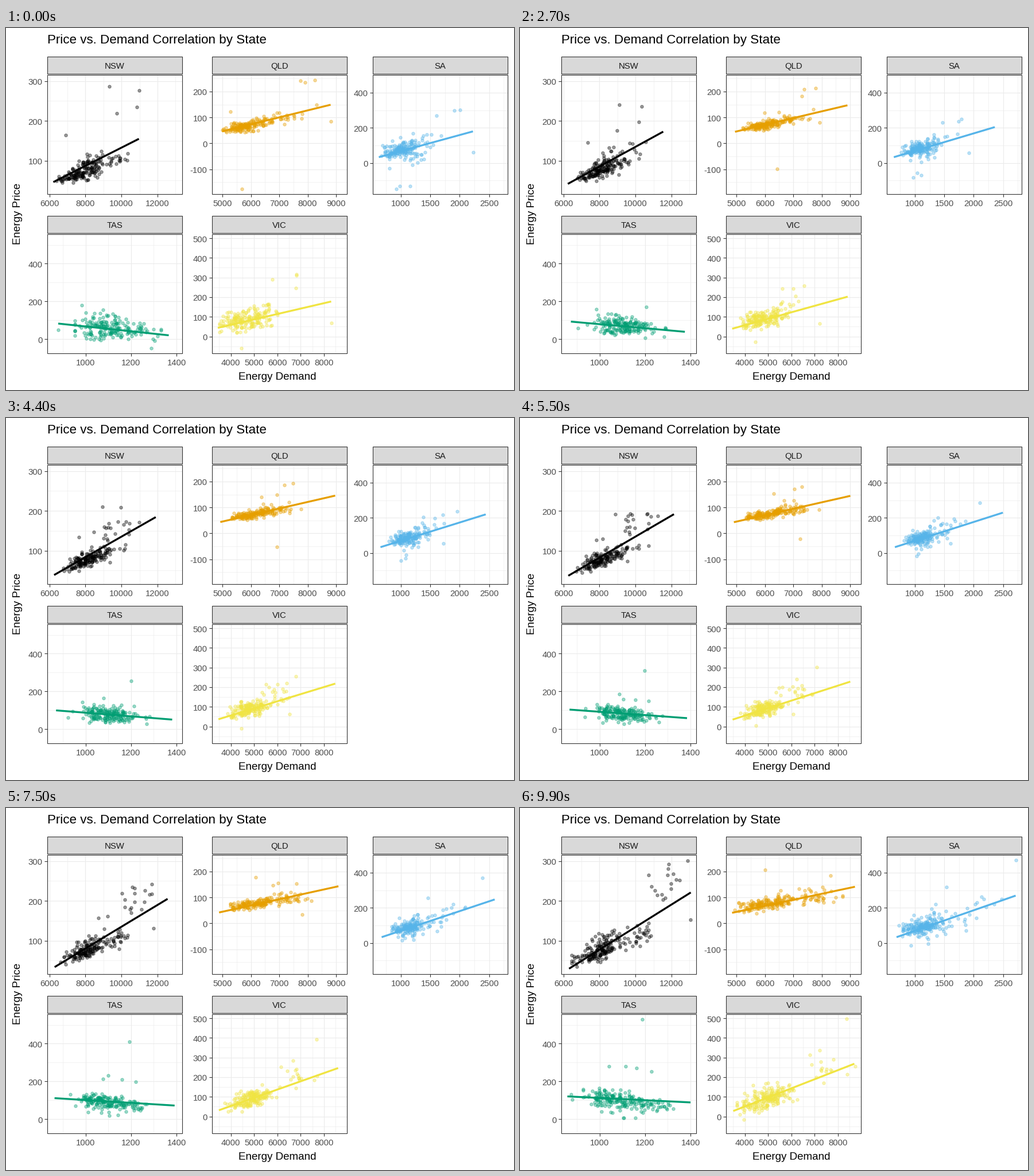
A matplotlib script that plays this animation: 885 px wide and 632 px high, repeating every 10000 ms.

```python
import matplotlib.pyplot as plt
import numpy as np
from matplotlib.animation import FuncAnimation
from matplotlib.collections import LineCollection
from matplotlib.patches import Rectangle

W, H, DPI = 885, 632, 100
FRAMES, INTERVAL = 100, 100
PX = 72 / DPI          # points per pixel
DARK, GRID, TICK_TEXT = "#333333", "#EBEBEB", "#4D4D4D"
PANEL_W, PANEL_H, STRIP_H = 235.5, 208, 30
N_CLOUD, N_LATE = 180, 22

plt.rcParams["font.family"] = "Liberation Sans"
fig = plt.figure(figsize=(W / DPI, H / DPI), dpi=DPI, facecolor="white")
ax = fig.add_axes([0, 0, 1, 1])
ax.set(xlim=(0.5, W + 0.5), ylim=(H + 0.5, 0.5))   # pixels, y pointing down
ax.axis("off")


def label(x, y, text, size, color="black", ha="center", rotation=0):
    ax.text(x, y, text, fontsize=size * PX, color=color, ha=ha, va="baseline",
            rotation=rotation, rotation_mode="anchor")


def lines(segments, color, width, z):
    ax.add_collection(LineCollection(segments, colors=color,
                                     linewidths=width * PX, zorder=z))


def box(x, y, w, h, fill, z):
    ax.add_patch(Rectangle((x, y), w, h, facecolor=fill, edgecolor=DARK,
                           linewidth=1.1 * PX, zorder=z))


def ticks(scale, lo, hi):
    """Major pixels and values, and the half steps between them."""
    value, pixel, step, gap = scale
    k = np.arange(-1, 12) / 2
    pos = pixel + gap * k
    inside = (pos > lo + 1) & (pos < hi - 1)
    major = inside & (k % 1 == 0)
    return pos[major], value + step * k[major], pos[inside & ~major]


def draw_panel(name, x, y, xscale, yscale):
    right, top = x + PANEL_W, y + STRIP_H + 2
    bottom = top + PANEL_H
    box(x, y, PANEL_W, STRIP_H, "#D9D9D9", 1)
    label(x + PANEL_W / 2, y + 21.5, name, 14.9, "#1A1A1A")

    xmaj, xval, xmin = ticks(xscale, x, right)
    ymaj, yval, ymin = ticks(yscale, top, bottom)
    for xs, ys, width in ((xmin, ymin, 0.6), (xmaj, ymaj, 1.1)):
        lines([[(u, top), (u, bottom)] for u in xs], GRID, width, 1)
        lines([[(x, v), (right, v)] for v in ys], GRID, width, 1)
    box(x, top, PANEL_W, PANEL_H, "none", 6)
    lines([[(u, bottom), (u, bottom + 5)] for u in xmaj], DARK, 1.1, 6)
    lines([[(x - 5, v), (x, v)] for v in ymaj], DARK, 1.1, 6)

    for u, value in zip(xmaj, xval):
        label(u, bottom + 21.5, f"{value:.0f}", 14.9, TICK_TEXT)
    for v, value in zip(ymaj, yval):
        label(x - 8, v + 6.5, f"{value:.0f}", 14.9, TICK_TEXT, ha="right")


def cloud(rng, blobs, n, tilt, spread=1.0):
    """Draw n points from blobs (weight, cx, cy, sx, sy), sheared by tilt."""
    b = np.array(blobs, float)
    pick = rng.choice(len(b), n, p=b[:, 0] / b[:, 0].sum())
    _, cx, cy, sx, sy = b[pick].T
    u, v = spread * np.clip(rng.normal(size=(2, n)), -2.1, 2.1)
    return np.column_stack([cx + sx * u, cy + sy * v + tilt * sx * u])


class Panel:
    """One state: its cloud and trend line drift linearly from start to stop."""

    def __init__(self, name, color, x, y, xscale, yscale, fit, start, stop, paths):
        draw_panel(name, x, y, xscale, yscale)
        rng = np.random.default_rng(11 + x + y)
        self.fit = np.array(fit, float)
        tilt = [0.5 * (y1 - y0) / (x1 - x0) for x0, y0, x1, y1 in fit]
        paths = np.array(paths, float)
        self.a = np.vstack([cloud(rng, start, N_CLOUD, tilt[0]), paths[:, :2]])
        self.b = np.vstack([cloud(rng, stop, N_CLOUD, tilt[1]), paths[:, 2:]])
        self.late = cloud(rng, stop[:2], N_LATE, tilt[1], 1.5)
        self.dots = ax.scatter([], [], s=(5.4 * PX) ** 2, color=color, alpha=0.4,
                               linewidths=PX, zorder=3)
        self.line, = ax.plot([], [], color=color, lw=3.3 * PX,
                             solid_capstyle="butt", zorder=4)

    def update(self, t):
        pts = self.a + (self.b - self.a) * t
        if t == 1:     # points without a partner appear with the final state
            pts = np.vstack([pts, self.late])
        self.dots.set_offsets(pts)
        x0, y0, x1, y1 = self.fit[0] + (self.fit[1] - self.fit[0]) * t
        self.line.set_data([x0, x1], [y0, y1])


label(72, 27.5, "Price vs. Demand Correlation by State", 22.4, ha="left")
label(473.5, 614.5, "Energy Demand", 18.8)
label(25.5, 324.5, "Energy Price", 18.8, rotation=90)

# Scales are (first value, its pixel, value step, pixel step).
panels = [
    Panel("NSW", "#000000", 72, 50, (6000, 76, 2000, 62.8), (100, 232, 100, -69.5),
          fit=[(83, 269.5, 232, 194), (86, 281, 298, 148)],
          start=[(70, 119, 258, 17, 4), (80, 146, 242, 14, 11), (16, 190, 230, 16, 6)],
          stop=[(60, 124, 258, 16, 7), (78, 147, 243, 13, 11), (28, 205, 224, 20, 9),
                (10, 260, 135, 17, 17)],
          paths=[(180, 102, 155, 222), (232, 109, 160, 215), (228, 138, 154, 235),
                 (193, 149, 105, 262), (104, 187, 157, 235), (136, 262, 292, 92),
                 (101, 264, 259, 98), (134, 253, 224, 117), (133, 260, 297, 195)]),
    Panel("QLD", "#E69F00", 359, 50, (5000, 377.5, 1000, 49.5), (-100, 247, 100, -45.2),
          fit=[(377, 181, 566, 134.5), (370, 183.5, 584, 138)],
          start=[(140, 413, 172, 17, 5), (36, 468, 160, 23, 5)],
          stop=[(60, 409, 172, 13, 5), (80, 447, 164, 15, 5), (44, 508, 156, 26, 8)],
          paths=[(411, 281, 550, 156), (513, 92, 450, 150), (521, 95, 412, 184),
                 (538, 91, 454, 144), (391, 146, 520, 155), (541, 134, 433, 164),
                 (566, 163, 405, 171), (461, 162, 427, 108), (399, 178, 541, 118)]),
    Panel("SA", "#56B4E9", 639, 50, (1000, 688.5, 500, 51.2), (0, 236, 200, -61.3),
          fit=[(650, 226, 814, 181), (656.5, 226, 864, 153.5)],
          start=[(115, 688, 213, 16, 6), (45, 704, 213, 17, 13), (14, 737, 196, 11, 8)],
          stop=[(118, 697, 209, 14, 6), (40, 711, 210, 17, 13), (16, 760, 198, 22, 13),
                (8, 795, 168, 22, 14)],
          paths=[(680, 281, 700, 210), (704, 276, 687, 207), (686, 276, 711, 193),
                 (750, 153, 699, 200), (781, 144, 737, 202), (791, 143, 692, 217),
                 (814, 217, 699, 222), (724, 221, 864, 91), (711, 219, 743, 138)]),
    Panel("TAS", "#009E73", 72, 328, (1000, 139, 200, 79.3), (0, 543.5, 200, -65.8),
          fit=[(91.5, 516.5, 284, 537), (83, 504, 297.5, 514.5)],
          start=[(125, 167, 522, 22, 11), (50, 222, 530, 23, 7)],
          stop=[(100, 152, 507, 20, 7), (75, 213, 516, 23, 6), (8, 175, 538, 26, 5)],
          paths=[(91, 527, 131, 518), (132, 484, 136, 513), (169, 492, 135, 520),
                 (253, 559, 126, 494), (223, 532, 213, 369), (160, 521, 184, 451),
                 (213, 543, 155, 451), (200, 540, 203, 454), (219, 538, 229, 460)]),
    Panel("VIC", "#F0E442", 359, 328, (4000, 392, 1000, 40.6), (0, 539, 100, -34.3),
          fit=[(369.5, 524, 567, 478), (372, 529.5, 583, 447)],
          start=[(95, 406, 513, 16, 9), (80, 438, 504, 17, 9)],
          stop=[(90, 414, 511, 17, 9), (80, 446, 503, 14, 8), (12, 535, 450, 22, 14)],
          paths=[(464, 439, 441, 498), (506, 430, 468, 506), (506, 432, 398, 518),
                 (505, 454, 414, 508), (567, 515, 404, 520), (410, 559, 412, 521),
                 (454, 519, 569, 368), (399, 519, 505, 431), (414, 522, 584, 451)]),
]


def update(i):
    for p in panels:
        p.update(i / (FRAMES - 1))
    return []


anim = FuncAnimation(fig, update, frames=FRAMES, interval=INTERVAL, repeat=True,
                     repeat_delay=0)
plt.show()
```
